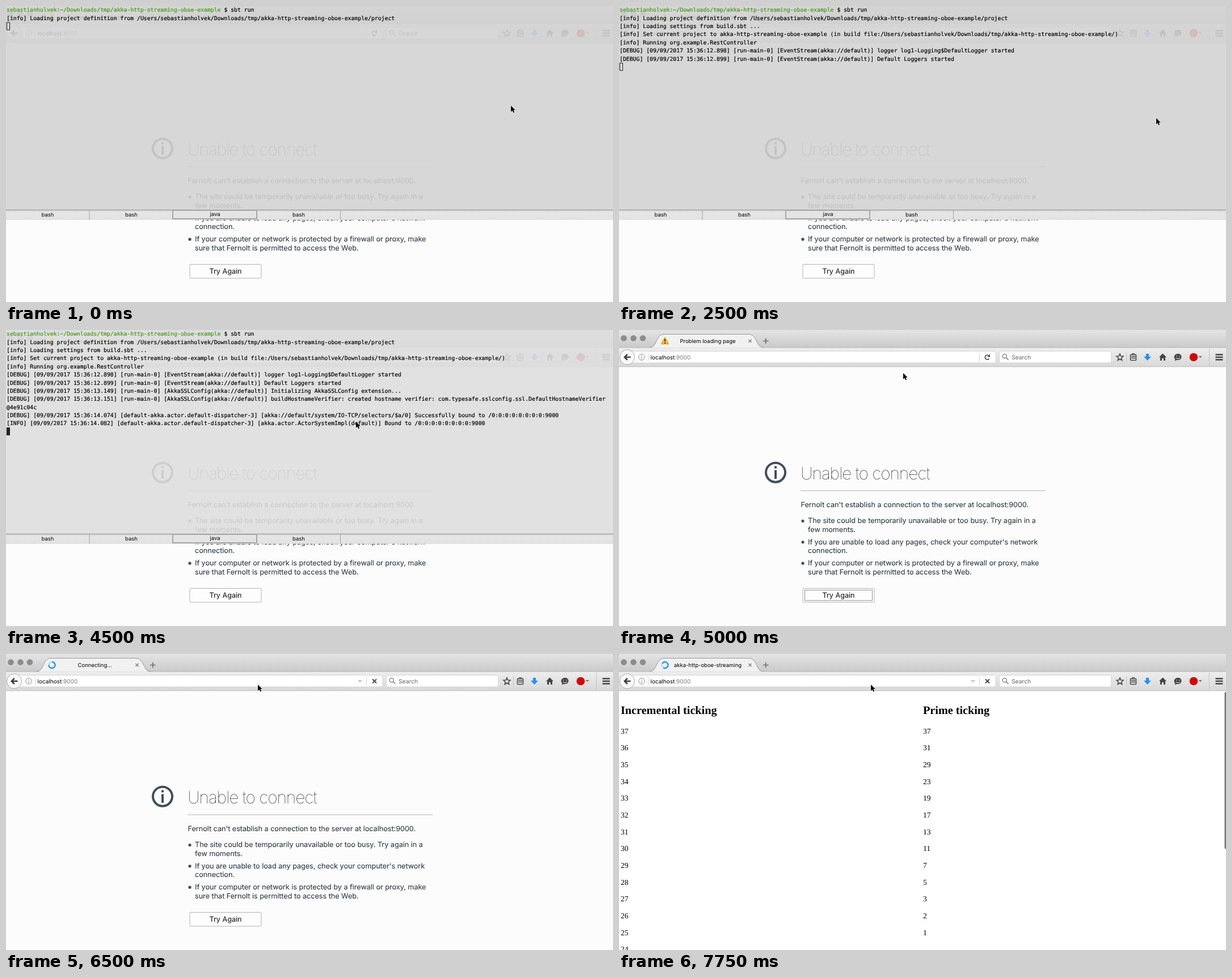
Write an HTML page that moves like this. It is 1070 px wide and 523 px high and loops after 8 s.

```html
<!DOCTYPE html>
<html lang="en">
<head>
<meta charset="utf-8">
<title>Streaming demo</title>
<style>
html, body { margin: 0; width: 100%; height: 100%; overflow: hidden; background: #fcfcfc; }
svg { display: block; }
text { font-family: Inter, sans-serif; text-rendering: geometricPrecision; }
.mid { text-anchor: middle; }
.tab { font-size: 9.5px; fill: #000; }
.field { font-size: 10px; fill: #000; }
.field.hint { font-size: 10.3px; fill: #666; }
.body text { font-size: 12.6px; fill: #36434e; stroke: #36434e; stroke-width: .15; }
.body .title { font-size: 30px; font-weight: 100; letter-spacing: -1.1px; fill: #222; stroke: none; }
.body .label { fill: #222; }
.mono text { font: 9.8px "DejaVu Sans Mono", monospace; stroke: #000; stroke-width: .2; }
.mono .prompt { fill: #469a1c; stroke: #469a1c; }
.ticks text { font: 13.5px "Liberation Serif", serif; }
.ticks .head { font-size: 20.2px; font-weight: bold; }
.line { fill: none; stroke: #4a4a4a; stroke-width: 1.6; }
</style>
</head>
<body>
<svg width="1070" height="523" viewBox="0 0 1070 523">
<defs>
  <linearGradient id="strip" x2="0" y2="1"><stop stop-color="#e4e4e4"/><stop offset="1" stop-color="#cacaca"/></linearGradient>
  <linearGradient id="bar" x2="0" y2="1"><stop stop-color="#eeeeee"/><stop offset="1" stop-color="#d8d8d8"/></linearGradient>
  <linearGradient id="foot" x2="0" y2="1"><stop stop-color="#d9d9d9"/><stop offset=".3" stop-color="#e6e6e6"/><stop offset="1" stop-color="#e1e1e1"/></linearGradient>
</defs>

<!-- browser chrome -->
<rect width="1070" height="31" fill="url(#strip)"/>
<g fill="#8d8d8d"><circle cx="8.500" cy="14.500" r="5.300"/><circle cx="25.500" cy="14.500" r="5.300"/><circle cx="42" cy="14.500" r="5.300"/></g>
<rect y="31" width="1070" height="34" fill="url(#bar)"/>
<path d="M0 31H1070" stroke="#b4b4b4"/>
<path d="M0 65H1070" stroke="#b2b2b2"/>
<path d="M54 31.500C68 31 64 7.500 79 7.500H229C245 7.500 240 31 255 31.500Z" fill="#f1f1f1"/>
<path d="M54 31C68 31 64 7.500 79 7.500H229C245 7.500 240 31 255 31" fill="none" stroke="#9a9a9a"/>
<path d="M228.500 17l5 5m0-5l-5 5" stroke="#8a8a8a" stroke-width="1.700"/>
<path d="M254 19.500h9.500m-4.750-4.750v9.500" stroke="#6f6f6f" stroke-width="1.700"/>

<g data-at="0,6500">
  <path d="M81 13.500L87 24.500H75Z" fill="#fbc02d" stroke="#e8a913" stroke-width="2" stroke-linejoin="round"/>
  <path d="M81 16v4.500m0 1.500v2" stroke="#333" stroke-width="1.800"/>
  <text class="tab mid" x="156.500" y="23">Problem loading page</text>
</g>
<text class="tab mid" x="156.500" y="23" data-at="6500,6750">Connecting…</text>
<text class="tab mid" x="156.500" y="23" data-at="6750">akka-http-oboe-streaming</text>
<g id="spin" data-at="6500" fill="none" stroke-width="2.500">
  <circle cx="81" cy="19.500" r="5.500" stroke="#b5dcfb"/>
  <path d="M81 14a5.500 5.500 0 1 1-5.500 5.500" stroke="#2c9af5"/>
</g>

<path d="M22 37.500H661.500Q664 37.500 664 40V55.500Q664 58 661.500 58H22Z" fill="#fff" stroke="#cfcfcf" stroke-width=".8"/>
<rect x="670.500" y="37.500" width="197" height="20.500" rx="2.500" fill="#fff" stroke="#cfcfcf" stroke-width=".8"/>
<g data-at="6000,6500">
  <path d="M22 37.500H661.500Q664 37.500 664 40V55.500Q664 58 661.500 58H22Z" fill="none" stroke="#7fb3ea" stroke-width="2"/>
  <rect x="55" y="41.500" width="73" height="13" fill="#b3d7fd"/>
</g>
<circle cx="14.500" cy="48" r="13" fill="#fafafa" stroke="#a9a9a9"/>
<path d="M20.500 48H10m4.800-5L9.800 48l5 5" fill="none" stroke="#3c3c3c" stroke-width="2.500"/>
<circle cx="40" cy="48" r="5.300" fill="none" stroke="#8c8c8c"/>
<path d="M40 45v1.200m0 1v4" stroke="#8c8c8c" stroke-width="1.200"/>
<path d="M51.500 41v14M635.500 41v14" stroke="#d5d5d5"/>
<text class="field" x="55.500" y="52">localhost<tspan fill="#7a7a7a">:9000</tspan></text>
<path d="M619.500 46h9l-4.500 5Z" fill="#d0d0d0" data-at="5250"/>
<g data-at="0,6500">
  <path class="line" d="M652.500 50.500a4 4 0 1 1-.3-5"/>
  <path d="M654 42.500v5h-5Z" fill="#4a4a4a"/>
</g>
<path d="M646 44.500l7 7m0-7l-7 7" stroke="#4a4a4a" stroke-width="1.900" data-at="6500"/>
<circle cx="679.700" cy="46.300" r="3.600" fill="none" stroke="#7b7b7b" stroke-width="1.300"/>
<path d="M682.500 49l4 4" stroke="#7b7b7b" stroke-width="1.600"/>
<text class="field hint" x="692" y="52">Search</text>

<path class="line" d="M883 42l1.700 4 4.300.3-3.300 2.900 1 4.300-3.700-2.300-3.700 2.300 1-4.300-3.300-2.900 4.300-.3Z"/>
<path d="M894.500 40v16M1040.500 33v30" stroke="#c3c3c3"/>
<rect class="line" x="901.500" y="43.500" width="10" height="10" rx="1"/>
<path class="line" d="M903 46.500h7.500m-7.500 3h7.500M904 42h5"/>
<path d="M929 42h5v5h4l-6.500 7-6.500-7h4Z" fill="#2391f7"/>
<path d="M958.500 41.500l6.500 6.500h-2v6h-3v-4h-3v4h-3v-6h-2Z" fill="#444"/>
<path d="M985.500 42c8 0 8 11 0 11l-3 .2-3 1.300 1-3c-4-3-1.500-9.500 5-9.500Z" fill="#444"/>
<path d="M983 45.500v1.500m5-1.500v1.500m-6 2c1.500 2.500 5.500 2.500 7 0" fill="none" stroke="#e6e6e6" stroke-width="1.200"/>
<circle cx="1013" cy="48" r="7.300" fill="#d2080c"/>
<path d="M1021.500 46h6.500l-3.250 3.500Z" fill="#777"/>
<path d="M1051.500 43.500h13m-13 4.500h13m-13 4.500h13" stroke="#444" stroke-width="2.500"/>

<!-- error page -->
<g class="body" data-at="0,6750">
  <rect y="65.500" width="1070" height="458" fill="#fcfcfc"/>
  <circle cx="276" cy="251.700" r="17" fill="none" stroke="#424f5a" stroke-width="4"/>
  <path d="M276 240.500v4m0 3v15.500" stroke="#424f5a" stroke-width="4"/>
  <text class="title" x="320" y="264">Unable to connect</text>
  <path d="M320 284H752" stroke="#cbcbcb" stroke-width="1.500"/>
  <text x="320.500" y="313">Fernolt can't establish a connection to the server at localhost:9000.</text>
  <g fill="#424f5a"><circle cx="324" cy="337.500" r="2.600"/><circle cx="324" cy="374.800" r="2.600"/><circle cx="324" cy="412.200" r="2.600"/></g>
  <text x="333" y="341">The site could be temporarily unavailable or too busy. Try again in a</text>
  <text x="333" y="356.500">few moments.</text>
  <text x="333" y="378.500">If you are unable to load any pages, check your computer's network</text>
  <text x="333" y="394">connection.</text>
  <text x="333" y="416">If your computer or network is protected by a firewall or proxy, make</text>
  <text x="333" y="431.500">sure that Fernolt is permitted to access the Web.</text>
  <rect x="324" y="456.500" width="126" height="24.500" rx="1" fill="#fdfdfd" stroke="#b3b3b3"/>
  <rect x="327.500" y="459.500" width="119" height="18.500" fill="none" stroke="#222" stroke-dasharray="1 1" data-at="5000,6000"/>
  <text class="mid label" x="387" y="473.300">Try Again</text>
</g>

<!-- streamed page -->
<g class="ticks" id="ticks" data-at="6750">
  <rect y="65.500" width="1070" height="458" fill="#fff"/>
  <text class="head" x="3" y="106">Incremental ticking</text>
  <text class="head" x="536" y="106">Prime ticking</text>
  <rect id="thumb" x="1067.500" y="67" width="6" rx="3" fill="#757575"/>
</g>

<!-- terminal -->
<g data-at="0,5000">
  <rect width="1070" height="360" fill="#d3d3d3" fill-opacity=".89" data-at="0,3500"/>
  <rect width="1070" height="360" fill="#dedede" fill-opacity=".89" data-at="3500"/>
  <g class="mono" id="log"></g>
  <rect id="caret" x="1.500" width="5" height="13" stroke="#222"/>
  <rect y="360" width="1070" height="18" fill="url(#foot)"/>
  <path d="M0 360.500H1070" stroke="#a3a3a3" stroke-width="1.500"/>
  <path d="M147 361v17M589.500 361v17" stroke="#a6a6a6"/>
  <path d="M294 361V376H442V361Z" fill="#e4e4e4" stroke="#a6a6a6" stroke-width="2"/>
  <g class="mid">
    <text class="tab" x="73.500" y="372.300">bash</text><text class="tab" x="221" y="372.300">bash</text>
    <text class="tab" x="368.500" y="371.300">java</text><text class="tab" x="516" y="372.300">bash</text>
  </g>
</g>
<path id="mouse" d="M0 0V11L2.500 8.700 4.300 12.600 6.100 11.800 4.400 8H7.700Z" stroke="#fff" stroke-width=".8" paint-order="stroke"/>
</svg>

<script>
const LOOP = 8000, PITCH = 14.36, ROW = 29.67;
const $ = id => document.getElementById(id);

function add(parent, x, y, text) {
  const el = document.createElementNS('http://www.w3.org/2000/svg', 'text');
  el.setAttribute('x', x);
  el.setAttribute('y', y);
  el.textContent = text;
  parent.append(el);
  return el;
}

const user = 'sebastianholvek', dir = 'akka-http-streaming-oboe-example';
const stamp = s => `[09/09/2017 15:36:${s}]`;
const log = [
  [0, ''],
  [0, `[info] Loading project definition from /Users/${user}/Downloads/tmp/${dir}/project`],
  [500, '[info] Loading settings from build.sbt ...'],
  [500, `[info] Set current project to ${dir} (in build file:/Users/${user}/Downloads/tmp/${dir}/)`],
  [1500, '[info] Running org.example.RestController'],
  [2500, `[DEBUG] ${stamp('12.898')} [run-main-0] [EventStream(akka://default)] logger log1-Logging$DefaultLogger started`],
  [2500, `[DEBUG] ${stamp('12.899')} [run-main-0] [EventStream(akka://default)] Default Loggers started`],
  [2750, `[DEBUG] ${stamp('13.149')} [run-main-0] [AkkaSSLConfig(akka://default)] Initializing AkkaSSLConfig extension...`],
  [2750, `[DEBUG] ${stamp('13.151')} [run-main-0] [AkkaSSLConfig(akka://default)] buildHostnameVerifier: created hostname verifier: com.typesafe.sslconfig.ssl.DefaultHostnameVerifier`],
  [2750, '@4e91c04c'],
  [3750, `[DEBUG] ${stamp('14.074')} [default-akka.actor.default-dispatcher-3] [akka://default/system/IO-TCP/selectors/$a/0] Successfully bound to /0:0:0:0:0:0:0:0:9000`],
  [3750, `[INFO] ${stamp('14.082')} [default-akka.actor.default-dispatcher-3] [akka.actor.ActorSystemImpl(default)] Bound to /0:0:0:0:0:0:0:0:9000`]
];
log.forEach(([at, text], i) => {
  add($('log'), 1, 10.4 + i * PITCH, text).dataset.at = at;
});
$('log').firstChild.innerHTML = `<tspan class="prompt">${user}:~/Downloads/tmp/${dir}</tspan> $ sbt run`;

// time, x, y of the pointer tip
const path = [
  [0, 890, 176], [250, 947, 198], [3500, 797, 153], [3750, 535, 49], [4000, 554, 77],
  [4250, 614, 158], [4500, 617, 162], [5000, 501, 76], [5250, 447, 33], [5500, 445, 44], [5750, 444, 54]
];

const rows = Array.from({ length: 14 }, (_, i) =>
  [3, 536].map(x => add($('ticks'), x, 140.7 + i * ROW, '')));

function isPrime(n) {
  for (let d = 2; d * d <= n; d++) if (n % d === 0) return false;
  return true;
}

function countTo(n) {
  const all = Array.from({ length: n }, (_, i) => n - i);
  const primes = all.filter(isPrime);
  rows.forEach(([a, b], i) => {
    a.textContent = all[i] ?? '';
    b.textContent = primes[i] ?? '';
  });
  const view = 570, content = 72 + n * ROW;
  $('thumb').setAttribute('height', content > view ? view * view / content : 0);
}

const timed = [...document.querySelectorAll('[data-at]')].map(el => {
  const [from, to = LOOP] = el.dataset.at.split(',').map(Number);
  return { el, from, to };
});

let last = -1;
function draw() {
  const step = Math.floor(performance.now() % LOOP / 250), t = step * 250;
  if (step !== last) {
    last = step;
    for (const { el, from, to } of timed) el.style.display = t >= from && t < to ? '' : 'none';
    const [, x, y] = path.findLast(p => p[0] <= t);
    $('mouse').setAttribute('transform', `translate(${x} ${y})`);
    $('caret').setAttribute('y', log.filter(l => l[0] <= t).length * PITCH + 0.4);
    $('caret').setAttribute('fill', t < 3500 ? 'none' : '#222');
    $('spin').setAttribute('transform', `rotate(${(t - 6500) * 0.24} 81 19.5)`);
    if (t >= 6750) countTo(11 + Math.floor((t - 7000) / 250 * 26 / 3));
  }
  requestAnimationFrame(draw);
}
draw();
</script>
</body>
</html>
```
